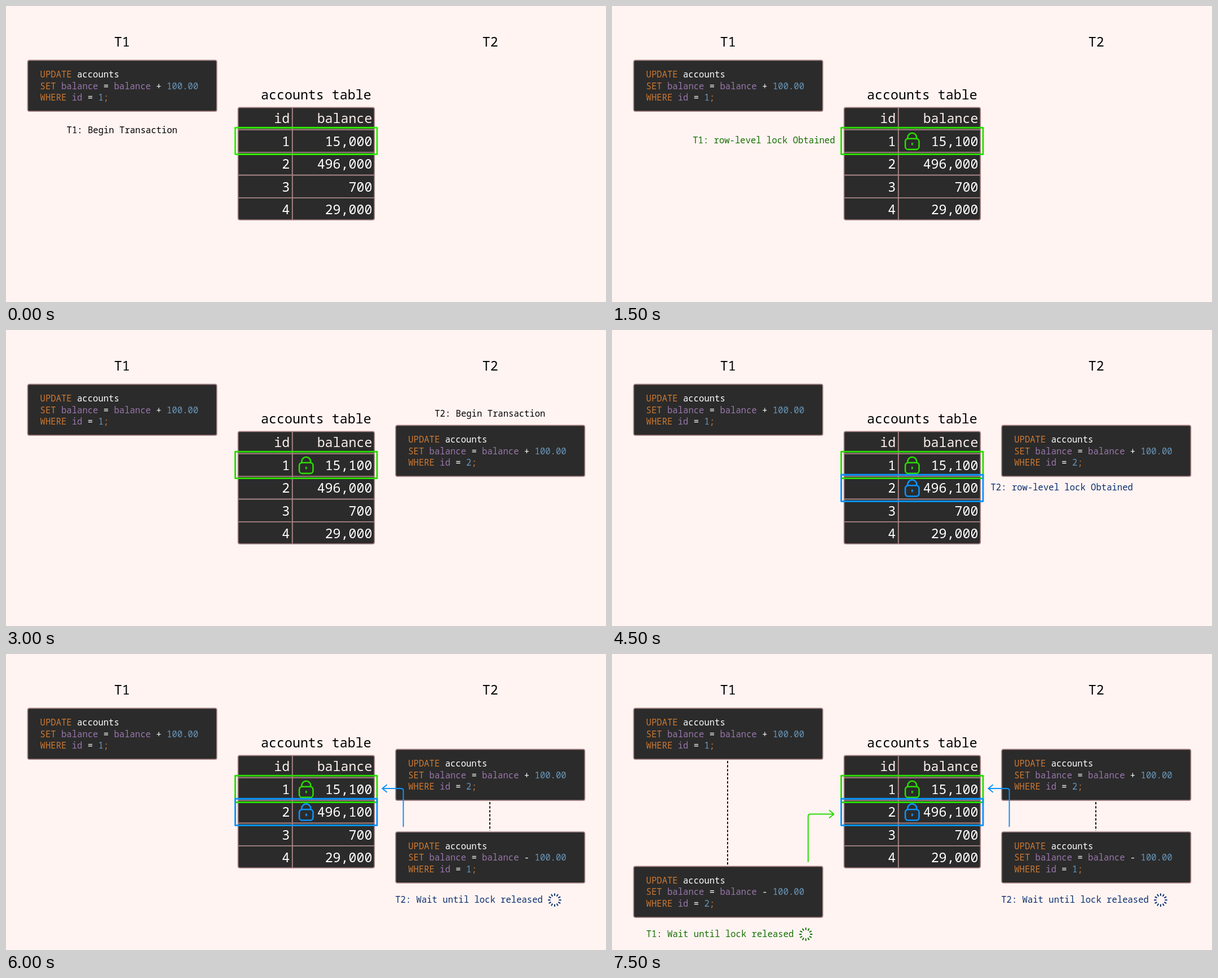
These frames come from a looping animation (1064 px wide and 526 px high, 8000 ms). An HTML page:

```html
<!DOCTYPE html>
<html lang="en">
<head>
<meta charset="utf-8">
<title>Row-level locks and deadlock</title>
<style>
  html, body { margin: 0; width: 100%; height: 100%; overflow: hidden; background: #fff4f2; }
  svg { display: block; width: 1064px; height: 526px; }
  text { font: 15.58px "Noto Sans Mono", "DejaVu Sans Mono", monospace; white-space: pre; }
  .big { font-size: 23.3px; }
  .cell { fill: #fff; text-anchor: end; }
  .head { fill: #fceeec; }
  .panel { fill: #2b2b2b; stroke: #a98587; stroke-width: 1.7; }
  .grid { fill: none; stroke: #a98587; stroke-width: 1.9; }
  .kw { fill: #cc7832; }
  .col { fill: #9876aa; }
  .num { fill: #6897bb; }
  .plain { fill: #fff; }
  .green { stroke: #2bdc00; }
  .blue { stroke: #0a94ff; }
  .t1 { fill: #147000; stroke: #147000; }
  .t2 { fill: #0a2f6e; stroke: #0a2f6e; }
  text.t1, text.t2 { stroke: none; }
  .line { fill: none; stroke-width: 2; stroke-linecap: round; stroke-linejoin: round; }
  .frame { fill: none; stroke-width: 2.9; stroke-linejoin: round; }
  .lock { fill: none; stroke-width: 2.6; stroke-linecap: round; }
  .dash { stroke: #000; stroke-width: 1.8; stroke-dasharray: 4.2 3; }

  /* Steps begin at 0, 1.5, 3, 4.5, 6 and 7.5 s of an 8 s loop. */
  .step { animation: 8s step-end infinite; }
  .s0 { animation-name: s0; }
  .s1 { animation-name: s1; }
  .s2 { animation-name: s2; }
  .s3 { animation-name: s3; }
  .to3 { animation-name: to3; }
  .from1 { animation-name: from1; }
  .from2 { animation-name: from2; }
  .from3 { animation-name: from3; }
  .from4 { animation-name: from4; }
  .from5 { animation-name: from5; }
  .dim { animation-name: dim; }
  @keyframes s0 { 0% { visibility: visible } 18.75%, 100% { visibility: hidden } }
  @keyframes s1 { 0%, 37.5%, 100% { visibility: hidden } 18.75% { visibility: visible } }
  @keyframes s2 { 0%, 56.25%, 100% { visibility: hidden } 37.5% { visibility: visible } }
  @keyframes s3 { 0%, 75%, 100% { visibility: hidden } 56.25% { visibility: visible } }
  @keyframes to3 { 0% { visibility: visible } 56.25%, 100% { visibility: hidden } }
  @keyframes from1 { 0% { visibility: hidden } 18.75%, 100% { visibility: visible } }
  @keyframes from2 { 0% { visibility: hidden } 37.5%, 100% { visibility: visible } }
  @keyframes from3 { 0% { visibility: hidden } 56.25%, 100% { visibility: visible } }
  @keyframes from4 { 0% { visibility: hidden } 75%, 100% { visibility: visible } }
  @keyframes from5 { 0% { visibility: hidden } 93.75%, 100% { visibility: visible } }
  @keyframes dim { 0% { stroke: #2ff000 } 18.75%, 100% { stroke: #2bdc00 } }
</style>
</head>
<body>
<svg id="stage" viewBox="0 0 1064 526"></svg>
<script>
  const text = (x, y, str, cls = "") => `<text x="${x}" y="${y}" class="${cls}">${str}</text>`;
  const group = (step, ...parts) => `<g class="step ${step}">${parts.join("")}</g>`;
  const span = (cls, str) => `<tspan class="${cls}">${str}</tspan>`;
  const path = (d, cls) => `<path d="${d}" class="${cls}"/>`;

  function query(x, y, sign, id) {
    const lines = [
      span("kw", "UPDATE") + " accounts",
      `${span("kw", "SET")} ${span("col", "balance")} = ${span("col", "balance")} ${sign} ${span("num", "100.00")}`,
      `${span("kw", "WHERE")} ${span("col", "id")} = ${span("num", id)}${span("kw", ";")}`
    ];
    return `<g transform="translate(${x} ${y})">
      <rect width="335.4" height="90.8" rx="3" class="panel"/>
      ${lines.map((s, i) => text(22.2, 30.7 + i * 20.5, s, "plain")).join("")}</g>`;
  }

  const rowY = i => 208.3 + i * 40.4;
  const cell = (x, i, str, cls = "") => text(x, rowY(i), str, "big cell " + cls);
  const idCell = (i, str, cls) => cell(503.3, i, str, cls);
  const balance = (i, str, cls) => cell(649.5, i, str, cls);

  function table() {
    const rules = [219.7, 260.1, 300.5, 340.9].map(y => `M411.5 ${y}H653`).join("");
    return `<rect x="411.5" y="180.3" width="241.8" height="199.8" rx="3" class="panel"/>`
      + path(rules + "M507.8 180.3V380", "grid")
      + idCell(0, "id", "head") + balance(0, "balance", "head")
      + [1, 2, 3, 4].map(i => idCell(i, i)).join("")
      + balance(3, "700") + balance(4, "29,000");
  }

  const frame = (y, cls) => `<rect x="406.5" y="${y}" width="251.5" height="47.3" class="frame ${cls}"/>`;

  const lock = (y, cls) => `<g transform="translate(532.3 ${y})" class="lock ${cls}">
    <rect x="-12.2" y="-4.6" width="24.4" height="19.2" rx="5"/>
    <path d="M-8 -5V-6.5a8 8 0 0 1 16 0V-5M0 3.7V6"/></g>`;

  function spinner(x, y, cls) {
    let ticks = "";
    for (let a = 0; a < 360; a += 30)
      ticks += `<path d="M0 -8.2V-11" transform="rotate(${a})"/>`;
    return `<g transform="translate(${x} ${y})" class="line ${cls}">${ticks}</g>`;
  }

  document.getElementById("stage").innerHTML = [
    text(191.8, 71.5, "T1", "big"),
    text(844.8, 71.5, "T2", "big"),
    text(452, 166.2, "accounts table", "big"),
    query(38.4, 96.4, "+", 1),
    table(),
    group("s0", balance(1, "15,000"), text(107.6, 225.6, "T1: Begin Transaction")),
    group("from1", balance(1, "15,100"), lock(240.3, "green")),
    group("s1", text(143.2, 244.4, "T1: row-level lock Obtained", "t1")),
    group("s2", text(760.2, 153.6, "T2: Begin Transaction")),
    group("from2", query(691, 169.4, "+", 2)),
    group("to3", balance(2, "496,000")),
    frame(216.2, "step dim"),
    group("from3", balance(2, "496,100"), lock(280.9, "blue"), frame(257.2, "blue")),
    group("s3", text(671.5, 284.6, "T2: row-level lock Obtained", "t2")),
    group("from4",
      query(691, 316.1, "-", 1),
      path("M858 263V314", "dash"),
      path("M704.6 306.5V243q0 -4 -4 -4H667.5M675 232.7L667.3 239L675 245.3", "line blue"),
      text(690.2, 441.9, "T2: Wait until lock released", "t2"),
      spinner(972.9, 437.2, "t2")),
    group("from5",
      query(38.4, 377.3, "-", 2),
      path("M205 190V375", "dash"),
      path("M347.8 369V288.5q0 -4 4 -4H393M385.7 278L393.4 284.5L385.7 291", "line green"),
      text(60.7, 502.7, "T1: Wait until lock released", "t1"),
      spinner(343.7, 498, "t1"))
  ].join("");
</script>
</body>
</html>
```
